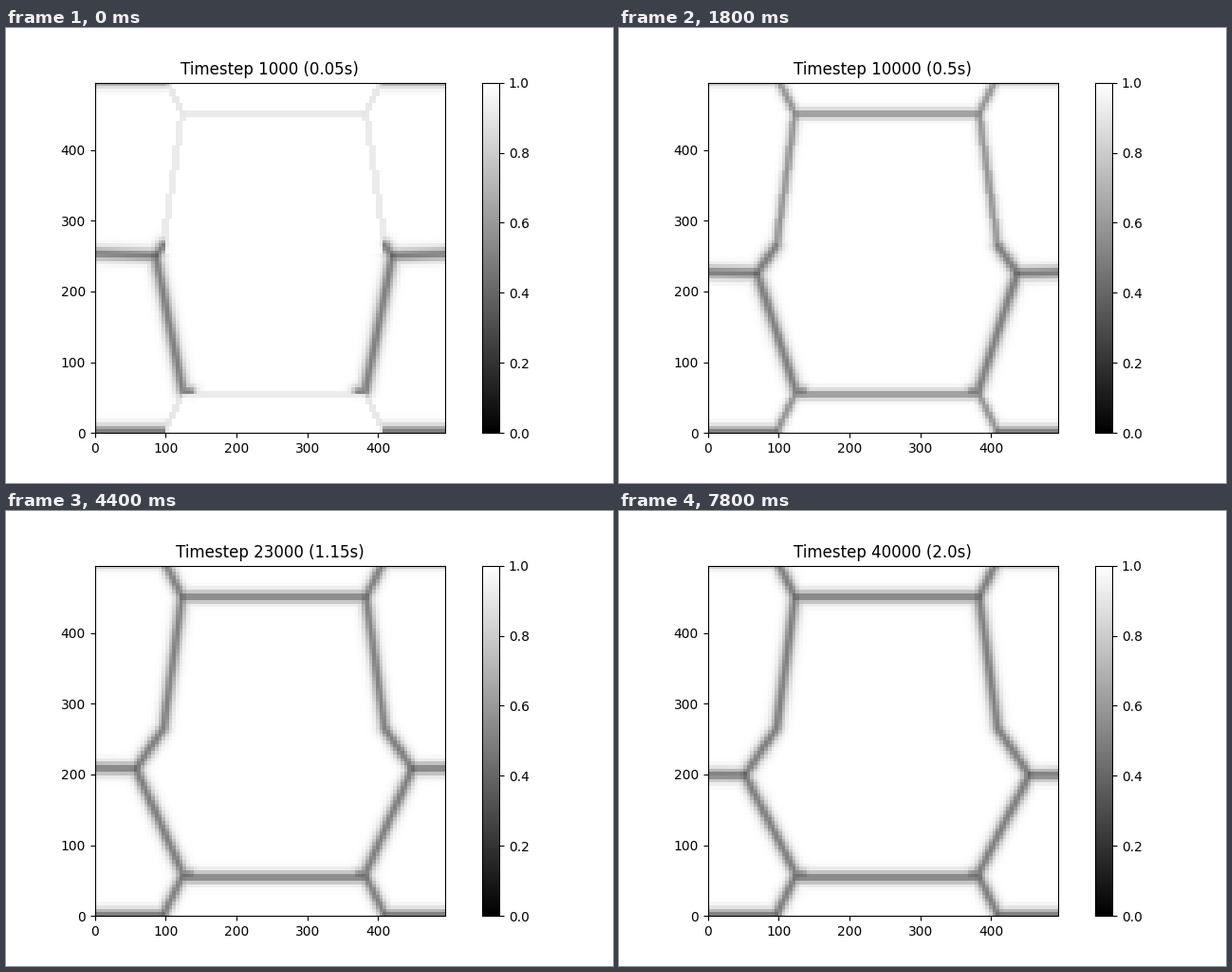
Animation, 640 px wide and 480 px high, one loop 8 s. Source, as a matplotlib script:

```python
import numpy as np
import matplotlib.pyplot as plt
from matplotlib.animation import FuncAnimation

N = 100            # grid cells per side
SIZE = 495         # domain length
CELL = SIZE / N
FRAMES = 40
WIDTH = 1.65       # settled interface width, in cells

c = np.arange(N) + 0.5
X, Y = np.meshgrid(51 - np.abs(c - 51), c)   # left-right mirror symmetry

# corners of the slow grain boundaries, in cells
TOP = (24.8, 91)
LOW = (24.8, 11)
TOP_END = (19.5, 101.5)
LOW_END = (19.5, 0.5)
KNEE = (19.5, 53.5)


def line_x(p, q):
    return p[0] + (Y - p[1]) * (q[0] - p[0]) / (q[1] - p[1])


# regions in which boundaries respond slowly
IN_CAP = ((Y < LOW[1]) & (X > line_x(LOW_END, LOW))) | (
    (Y > TOP[1]) & (X > line_x(TOP_END, TOP)))
IN_CORE = (Y > 51) & (Y < TOP[1]) & (
    X > np.maximum(20, np.round(line_x(KNEE, TOP))))
STIFF = IN_CAP | IN_CORE


def decay(t, tau):
    return np.exp(-(t - 1) / tau)


def dip(dist, width=WIDTH, amp=1.0):
    return 0.5 * amp / np.cosh(np.minimum(dist / width, 20)) ** 2


def segment(p, q):
    """Distance from every cell to the segment p-q."""
    dx, dy = q[0] - p[0], q[1] - p[1]
    s = ((X - p[0]) * dx + (Y - p[1]) * dy) / (dx * dx + dy * dy)
    s = np.clip(s, 0, 1)
    return np.hypot(X - p[0] - s * dx, Y - p[1] - s * dy)


def steep(p, q, step):
    """Distance to a steep line that starts as a staircase of cells."""
    xl = line_x(p, q)
    xl = xl + step * (np.round(xl) - xl)
    cos = np.cos(np.arctan2(q[0] - p[0], q[1] - p[1]))
    lo, hi = sorted((p[1], q[1]))
    over = np.maximum(np.maximum(lo - Y, Y - hi), 0)
    return np.hypot((X - xl) * cos, over)


def level(p):
    """Distance to a horizontal line running inward from p."""
    return np.hypot(Y - p[1], np.maximum(p[0] - X, 0))


def field(t):
    # moving triple junction
    jy = 194.5 + 55.7 * decay(t, 15.2)
    jx = 52 + 0.65 * (jy - 199)
    joint = (jx / CELL, jy / CELL)
    edge = (-1, (jy + 3 * decay(t, 12)) / CELL)

    width = 1.62 - 1.12 * decay(t, 7.5)
    amp = 1 - 0.62 * decay(t, 6.5)
    step = decay(t, 8)
    soft = np.where(STIFF, 1 - 0.85 * decay(t, 5), 1.0)

    def slow(dist):
        return dip(dist, width, amp)

    def fast(p, q):
        return dip(segment(p, q)) * soft

    settle = decay(t, 2)
    floor = 0.2 + 0.25 * settle
    roof = 101.4 - 0.7 * settle
    foot = (25, 12)

    walls = [
        np.maximum(slow(steep(KNEE, TOP, step)), fast(joint, KNEE)),
        np.maximum(fast(joint, foot), fast(foot, (27, 11.6))),
        fast(edge, joint),
        slow(level(TOP)),
        slow(level(LOW)),
        slow(steep(TOP, TOP_END, step)),
        slow(steep(LOW_END, LOW, step)),
        fast((-1, floor), (19.5, floor)),
        fast((-1, roof), (19.5, roof)),
    ]
    total = sum(w ** 5 for w in walls) ** 0.2
    return 1 - np.minimum(total, 0.64)


fig, ax = plt.subplots(figsize=(6.4, 4.8), dpi=100)
img = ax.imshow(field(1), cmap="gray", vmin=0, vmax=1, origin="lower",
                extent=(0, SIZE, 0, SIZE), interpolation="nearest")
fig.colorbar(img, ax=ax)
ax.set_anchor("C")   # keep the square plot centred in its slot
title = ax.set_title("")


def draw(i):
    n = 1000 * (i + 1)
    img.set_data(field(i + 1))
    title.set_text(f"Timestep {n} ({n / 20000}s)")
    return img, title


anim = FuncAnimation(fig, draw, frames=FRAMES, interval=200,
                     repeat=True, repeat_delay=0)
plt.show()
```
